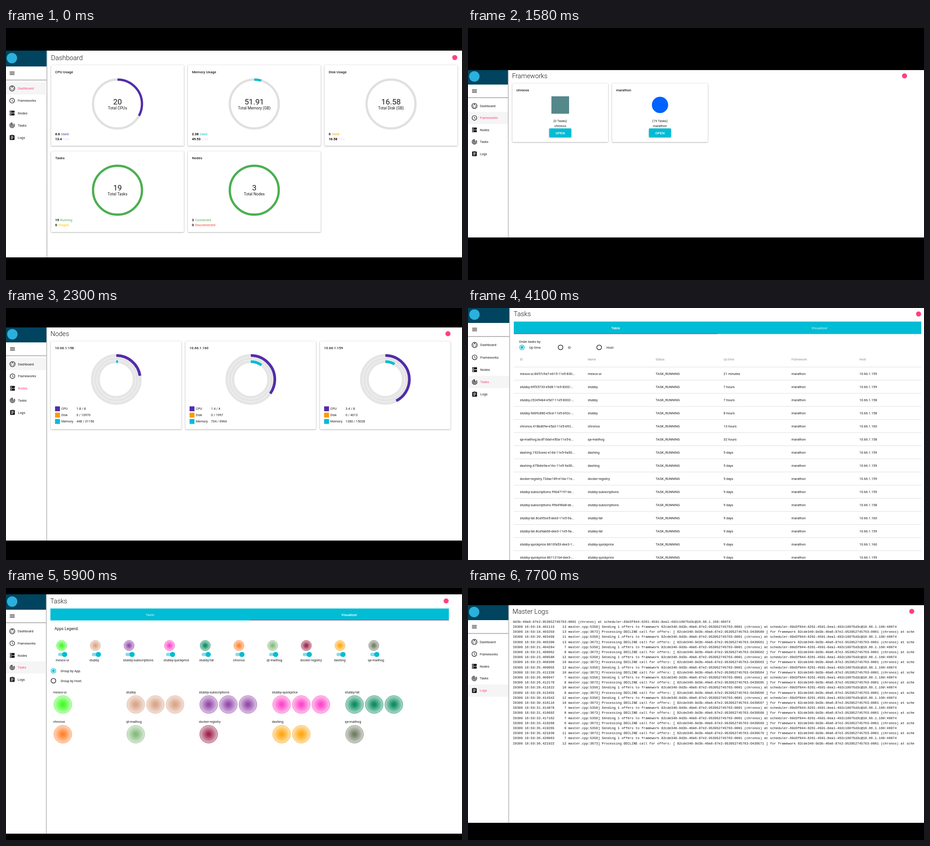
Write an HTML page with a canvas that moves like this. It is 1006 px wide and 557 px high and loops after 8 s.

```html
<!DOCTYPE html>
<html lang="en">
<head>
<meta charset="utf-8">
<title>Cluster dashboard</title>
<style>
  html, body { margin: 0; width: 100%; height: 100%; overflow: hidden; background: #000; }
  canvas { display: block; width: 1006px; height: 557px; }
</style>
</head>
<body>
<canvas id="stage"></canvas>
<script>
const W = 1006, H = 557, LOOP = 8000, TAU = Math.PI * 2;
const canvas = document.getElementById('stage');
const ctx = canvas.getContext('2d');
const dpr = window.devicePixelRatio || 1;
canvas.width = W * dpr;
canvas.height = H * dpr;

const INK = '#1a1a1a', PINK = '#ff4081', CYAN = '#00bcd4', PURPLE = '#512da8',
      ORANGE = '#ff9800', AMBER = '#ffc107', GREEN = '#4caf50', RED = '#f44336',
      GREY = '#e0e0e0', NAVY = '#00445f', LOGO = '#2bb0dc';

// ---------- drawing helpers ----------

// y is the middle of the capitals; the tenfold font keeps letter advances unrounded
function text(str, x, y, size, { color = INK, weight = 400, align = 'left', family = 'Roboto, sans-serif' } = {}) {
  ctx.save();
  ctx.translate(x, y + size * 0.356);
  ctx.scale(0.1, 0.1);
  ctx.font = `${weight} ${size * 10}px ${family}`;
  ctx.textAlign = align;
  ctx.fillStyle = color;
  ctx.fillText(str, 0, 0);
  ctx.restore();
}

function rect(x, y, w, h, color) {
  ctx.fillStyle = color;
  ctx.fillRect(x, y, w, h);
}

function round(x, y, w, h, r, color) {
  ctx.fillStyle = color;
  ctx.beginPath();
  ctx.roundRect(x, y, w, h, r);
  ctx.fill();
}

function disc(x, y, r, color) {
  ctx.fillStyle = color;
  ctx.beginPath();
  ctx.arc(x, y, r, 0, TAU);
  ctx.fill();
}

// Arc clockwise from the top, "part" being the share of a full turn
function arc(x, y, r, width, color, part = 1, from = 0) {
  const start = (from - 0.25) * TAU;
  ctx.strokeStyle = color;
  ctx.lineWidth = width;
  ctx.beginPath();
  ctx.arc(x, y, r, start, start + part * TAU);
  ctx.stroke();
}

function raised(x, y, w, h, color = '#fff') {
  ctx.save();
  ctx.shadowColor = 'rgba(0,0,0,.38)';
  ctx.shadowBlur = 3 * dpr;
  ctx.shadowOffsetY = 0.8 * dpr;
  round(x, y, w, h, 1.5, color);
  ctx.restore();
}

function radio(x, y, on) {
  arc(x, y, 5.2, 1.3, on ? CYAN : '#111');
  if (on) disc(x, y, 3, CYAN);
}

function alpha(hex, a) {
  return hex + Math.round(a * 255).toString(16).padStart(2, '0');
}

function bubble(x, y, r, color) {
  const g = ctx.createRadialGradient(x, y, 0, x, y, r);
  g.addColorStop(0, color);
  g.addColorStop(0.2, alpha(color, 0.92));
  g.addColorStop(1, alpha(color, 0.3));
  disc(x, y, r, g);
  arc(x, y, r - 0.3, 0.7, alpha(color, 0.9));
}

// ---------- icons on a 24 unit grid ----------

const icons = {
  menu() {
    for (const y of [6, 11, 16]) rect(3, y, 18, 2, '#111');
  },
  Dashboard() {
    arc(12, 12, 10, 2, '#111');
    round(9, 5, 6, 3, 1.5, '#111');
    for (const d of [-1, 1]) {
      disc(12 + 5.5 * d, 11.5, 1.5, '#111');
      disc(12 + 3.5 * d, 16.5, 1.5, '#111');
    }
  },
  Frameworks() {
    arc(12, 12, 9, 2, '#111');
    ctx.lineWidth = 1.6;
    ctx.beginPath();
    ctx.moveTo(11.8, 7);
    ctx.lineTo(11.8, 12.6);
    ctx.lineTo(16.6, 15.4);
    ctx.stroke();
  },
  Nodes() {
    for (const y of [3, 13]) {
      round(3, y, 18, 8, 1, '#111');
      disc(7, y + 4, 2, '#fff');
    }
  },
  Tasks() {
    arc(12, 12, 9, 2, '#111', 0.86, 0.125);
    arc(12, 12, 5, 2, '#111', 0.84, 0.125);
    disc(12, 12, 2, '#111');
    rect(11, 2, 2, 9, '#111');
  },
  Logs() {
    round(3, 3, 18, 18, 2, '#111');
    disc(12, 4, 3, '#111');
    disc(12, 4, 1, '#fff');
    rect(7, 7, 10, 2, '#fff');
    rect(7, 11, 10, 2, '#fff');
    rect(7, 15, 7, 2, '#fff');
  }
};

function icon(name, x, y, scale) {
  ctx.save();
  ctx.translate(x, y);
  ctx.scale(scale, scale);
  ctx.translate(-12, -12);
  icons[name]();
  ctx.restore();
}

// ---------- page frame ----------

const menu = ['Dashboard', 'Frameworks', 'Nodes', 'Tasks', 'Logs'];

function shell(p) {
  rect(0, 0, W, H, '#000');
  rect(0, p.top, W, p.bottom - p.top, '#fff');

  const edge = ctx.createLinearGradient(p.side - 0.5, 0, p.side + 2.5, 0);
  edge.addColorStop(0, '#8c8c8c');
  edge.addColorStop(0.5, '#c4c4c4');
  edge.addColorStop(1, '#fff');
  rect(p.side, p.top, 2.5, p.bottom - p.top, edge);

  rect(0, p.top, p.side, p.head - p.top, NAVY);
  disc(p.logo[0], p.logo[1], 11.5, LOGO);
  icon('menu', p.iconX, p.menuY, 0.59);
  rect(0, p.rule - 0.8, p.side, 1.6, '#a4a4a4');

  const lit = p.lit ?? p.active;
  rect(0, p.first + (lit - 0.5) * p.step, p.side, p.step, '#f5f5f5');
  menu.forEach((name, i) => {
    const y = p.first + i * p.step;
    icon(name, p.iconX, y, 0.96 * p.k);
    text(name, p.textX, y, 12 * p.k, { color: i === p.active ? PINK : INK });
  });

  text(p.title, p.titleX, p.titleY, 24 * p.k, { weight: 300, color: '#111' });
  disc(p.badgeX, p.titleY, 5.6, PINK);
}

// ---------- pages ----------

function gaugeCard(x, y, c) {
  const cx = x + 146.5, cy = y + 86;
  raised(x, y, 293, 178.5);
  text(c.title, x + 9, y + 15, 7.9, { weight: 500 });
  arc(cx, cy, 54, 5, c.base || GREY);
  if (c.part) arc(cx, cy, 54, 5, c.color, c.part);
  text(c.total, cx, cy - 5.5, 17.1, { align: 'center' });
  text(c.label, cx, cy + 8.5, 8.54, { align: 'center' });
  c.rows.forEach(([value, name, color, gap], i) => {
    const ry = y + 152 + i * 11.3;
    text(value, x + 9, ry, 7.32, { weight: 700, color: '#000' });
    text(name, x + 9 + gap, ry, 7.32, { color });
  });
}

function dashboard() {
  const cards = [
    { title: 'CPU Usage', total: '20', label: 'Total CPUs', color: PURPLE, part: 6.6 / 20,
      rows: [['6.6', 'Used', PURPLE, 13], ['13.4', 'Free', GREY, 17]] },
    { title: 'Memory Usage', total: '51.91', label: 'Total Memory (GB)', color: CYAN, part: 2.38 / 51.91,
      rows: [['2.38', 'Used', CYAN, 17.3], ['49.53', 'Free', GREY, 21.3]] },
    { title: 'Disk Usage', total: '16.58', label: 'Total Disk (GB)',
      rows: [['0', 'Used', ORANGE, 7], ['16.58', 'Free', GREY, 21.3]] },
    { title: 'Tasks', total: '19', label: 'Total Tasks', base: GREEN,
      rows: [['19', 'Running', GREEN, 11], ['0', 'Staged', AMBER, 7]] },
    { title: 'Nodes', total: '3', label: 'Total Nodes', base: GREEN,
      rows: [['3', 'Connected', GREEN, 7], ['0', 'Disconnected', RED, 7]] }
  ];
  cards.forEach((c, i) => gaugeCard(99.5 + (i % 3) * 301.7, 82 + Math.floor(i / 3) * 190.5, c));
}

function frameworks() {
  [['chronos', 0], ['marathon', 19]].forEach(([name, tasks], i) => {
    const x = 98 + i * 220, cx = x + 105.4;
    raised(x, 122.5, 211, 129.5);
    text(name, x + 8.8, 137, 7.73, { weight: 500 });
    if (i) disc(cx + 0.2, 170, 18, '#0062ff');
    else rect(184, 151, 39, 38.5, '#55888b');
    text(`(${tasks} Tasks)`, cx, 205.3, 7.2, { align: 'center' });
    text(name, cx, 216.3, 7.2, { align: 'center' });
    raised(x + 81.3, 222, 48.5, 19.5, CYAN);
    text('OPEN', cx, 232, 8, { align: 'center', weight: 500, color: '#fff' });
  });
}

function nodes() {
  const list = [
    { ip: '10.66.1.158', cpu: [1.8, 8], disk: [0, 10970], mem: [448, 31156] },
    { ip: '10.66.1.160', cpu: [1.4, 4], disk: [0, 1997], mem: [704, 6964] },
    { ip: '10.66.1.159', cpu: [3.4, 8], disk: [0, 4013], mem: [1280, 15028] }
  ];
  list.forEach((n, i) => {
    const x = 99 + i * 296.8, cx = x + 144.3, cy = 158;
    raised(x, 73.5, 288, 194.5);
    text(n.ip, x + 9, 88, 7.75, { weight: 500 });
    const rows = [['CPU', n.cpu, PURPLE], ['Disk', n.disk, ORANGE], ['Memory', n.mem, CYAN]];
    rows.forEach(([label, [used, all], color], j) => {
      const r = 52.9 - j * 6.7, y = 222.8 + j * 14;
      arc(cx, cy, r, 6, '#e5e5e5');
      if (used) arc(cx, cy, r, 6, color, used / all);
      rect(x + 9.2, y - 5.4, 10.8, 10.8, color);
      text(label, x + 23, y, 7.2);
      text(`${used} / ${all}`, x + 56.5, y, 7.2);
    });
  });
}

function tabs(x, y, w, h, active, ink, size) {
  rect(x, y, w, h, CYAN);
  rect(x + active * w / 2, y + h - 1.7, w / 2, 1.7, ink);
  ['Table', 'Visualizer'].forEach((name, i) => {
    text(name, x + w * (0.25 + i / 2), y + h / 2 + 0.2, size, {
      align: 'center', weight: 500, color: i === active ? '#fff' : 'rgba(255,255,255,.68)'
    });
  });
}

const tasks = `mesos-ui.8657c9a7-e615-11e5-830...|21 minutes|159
stubby.69f35733-e5d8-11e5-8302-...|7 hours|159
stubby.c52454b4-e5d7-11e5-8302-...|7 hours|158
stubby.9d69c880-e5cd-11e5-b92c-...|8 hours|158
chronos.418bd09e-e5a3-11e5-b92...|13 hours|160
qa-mailhog.bcdf1bbd-e50a-11e5-b...|32 hours|158
dashing.1923ceec-e16d-11e5-9a50...|5 days|159
dashing.475b6e9a-e16c-11e5-9a50...|5 days|159
docker-registry.72dac189-e16a-11e...|5 days|159
stubby-subscriptions.99b47197-de...|9 days|159
stubby-subscriptions.99b498a8-de...|9 days|158
stubby-tat.8ca95ce5-dee3-11e5-9a...|9 days|160
stubby-tat.8ca9ab06-dee3-11e5-9a...|9 days|159
stubby-quickprice.8610fa53-dee3-1...|9 days|160
stubby-quickprice.86112164-dee3-...|9 days|159`.split('\n').map(row => row.split('|'));

function taskTable() {
  tabs(101, 30, 899, 27.5, 0, '#b0508e', 8.1);
  text('Order tasks by:', 112.5, 74.2, 7.36);
  ['Up time', 'ID', 'Host'].forEach((name, i) => {
    radio(119 + i * 85.2, 87, i === 0);
    text(name, 135 + i * 85.2, 87, 7.36);
  });
  const colX = i => 114.4 + i * 149.8;
  ['ID', 'Name', 'Status', 'Up time', 'Framework', 'Host'].forEach((name, i) =>
    text(name, colX(i), 114, 6.85, { color: '#8f8f8f' }));
  rect(101, 130, 899, 0.8, '#d8d8d8');
  tasks.forEach(([id, up, host], i) => {
    const y = 145 + i * 29;
    const cells = [id, id.split('.')[0], 'TASK_RUNNING', up, 'marathon', '10.66.1.' + host];
    cells.forEach((cell, j) => text(cell, colX(j), y, 7.36));
    rect(101, y + 14, 899, 0.8, '#d8d8d8');
  });
}

// name, colour, task count, left edge in the legend
const apps = [
  ['mesos-ui', '#3cfc20', 1, 109.5],
  ['stubby', '#d9a286', 3, 184],
  ['stubby-subscriptions', '#9146a8', 3, 258.3],
  ['stubby-quickprice', '#ff40c8', 3, 347.6],
  ['stubby-tat', '#058a5c', 3, 426.3],
  ['chronos', '#ff7f2a', 1, 500.7],
  ['qt-mailhog', '#83ba7b', 1, 575],
  ['docker-registry', '#9b1f48', 1, 649.3],
  ['dashing', '#ffa50a', 2, 723.7],
  ['qa-mailhog', '#6f7a62', 1, 798.2]
];

function visualizer() {
  tabs(98, 45.3, 879, 26.4, 1, '#8080a8', 7.9);
  text('Apps Legend.', 107, 89.5, 8.8);
  apps.forEach(([name, color, count, left], i) => {
    const x = left + 13.2;
    bubble(x, 127.2, 11.6, color);
    round(x - 7.8, 143.2, 18, 7.4, 3.7, '#80deea');
    disc(x + 6.6, 146.9, 5.7, CYAN);
    text(name, left, 159.7, 7.2);

    const gx = 104 + (i % 5) * 160.9, gy = 230 + Math.floor(i / 5) * 65.7;
    text(name, gx, gy, 7.2);
    for (let j = 0; j < count; j++) bubble(gx + 21.4 + j * 43.3, gy + 27.5, 20, color);
  });
  ['Group by App.', 'Group by Host.'].forEach((name, i) => {
    radio(104.6, 183 + i * 22, i === 0);
    text(name, 120.4, 183 + i * 22, 7.2);
  });
}

// seconds and thread of each entry; offers and declines alternate
const logTimes = `18.401113 13,18.403259 13,20.403499 11,20.405390 13,21.404284 7,21.406062 8,
23.406580 12,23.408300 10,25.409055 12,25.411339 10,26.409947 7,26.412170 8,
28.411622 10,28.413455 8,30.414342 12,30.416116 10,31.414878 7,31.416692 8,
33.417162 7,33.419260 6,35.419265 9,35.421030 11,36.420063 7,36.421922 12`.split(/,\s*/);

function logLines() {
  const tail = '9d3b-40a6-87e2-953952745763', master = '82cde340-' + tail;
  const from = '-0001 (chronos) at scheduler-69d3f844-6261-4591-8ea1-492c10975d3c@10.66.1.160:46074';
  const target = 'framework ' + master + from;
  const lines = logTimes.map((entry, i) => {
    const [sec, thread] = entry.split(' ');
    const offer = 439560 + (i - 1) / 2;
    const body = i % 2
      ? `3673] Processing DECLINE call for offers: [ ${master}-O${offer} ] for ${target}`
      : `5350] Sending 1 offers to ${target}`;
    return `I0309 16:59:${sec}${thread.padStart(6)} master.cpp:${body}`.slice(0, 203);
  });
  return [tail + '-0001'.slice(0, 0) + from, ...lines];
}

function logs() {
  const family = '"Liberation Mono", monospace';
  logLines().forEach((line, i) =>
    text(line, 99, 74.2 + i * 11.2, 7.272, { family, color: '#111' }));
}

// ---------- timeline ----------

const scenes = [
  { at: 0, draw: dashboard, title: 'Dashboard', k: 0.61, top: 50, bottom: 507, side: 89.5, head: 85,
    menuY: 100, rule: 115, first: 133.5, step: 27.2, iconX: 13.5, textX: 26, active: 0,
    logo: [13, 66.5], titleX: 99.3, titleY: 65.3, badgeX: 990 },
  { at: 500, draw: frameworks, title: 'Frameworks', k: 0.596, top: 93, bottom: 463, side: 88, head: 125,
    menuY: 139.5, rule: 154, first: 172.2, step: 26.5, iconX: 14.2, textX: 26.3, active: 1,
    logo: [14, 107], titleX: 97.2, titleY: 105.8, badgeX: 963 },
  { at: 2300, draw: nodes, title: 'Nodes', k: 0.6, top: 43, bottom: 514, side: 89, head: 76,
    menuY: 90.5, rule: 105.5, first: 124, step: 26.75, iconX: 14.3, textX: 26.6, active: 2, lit: 0,
    logo: [14, 58], titleX: 98.3, titleY: 56.8, badgeX: 975 },
  { at: 4100, draw: taskTable, title: 'Tasks', k: 0.612, top: 0, bottom: 557, side: 91, head: 33,
    menuY: 47.5, rule: 63, first: 81.8, step: 27.25, iconX: 14.6, textX: 27.1, active: 3,
    logo: [14.2, 14.5], titleX: 100.7, titleY: 13.2, badgeX: 994 },
  { at: 5900, draw: visualizer, title: 'Tasks', k: 0.598, top: 14, bottom: 543, side: 88.3, head: 48,
    menuY: 62, rule: 76.7, first: 95.6, step: 26.7, iconX: 13.8, textX: 25.8, active: 3,
    logo: [13.5, 30], titleX: 97.8, titleY: 28.6, badgeX: 971 },
  { at: 7700, draw: logs, title: 'Master Logs', k: 0.603, top: 38, bottom: 519, side: 89, head: 71,
    menuY: 85.6, rule: 100.5, first: 119.2, step: 26.9, iconX: 14, textX: 26, active: 4,
    logo: [13.5, 53], titleX: 98.2, titleY: 51.6, badgeX: 979 }
];

const start = performance.now();

function frame() {
  const t = (performance.now() - start) % LOOP;
  const scene = scenes.findLast(s => s.at <= t);
  ctx.setTransform(dpr, 0, 0, dpr, 0, 0);
  shell(scene);
  scene.draw();
  requestAnimationFrame(frame);
}
frame();
</script>
</body>
</html>
```
